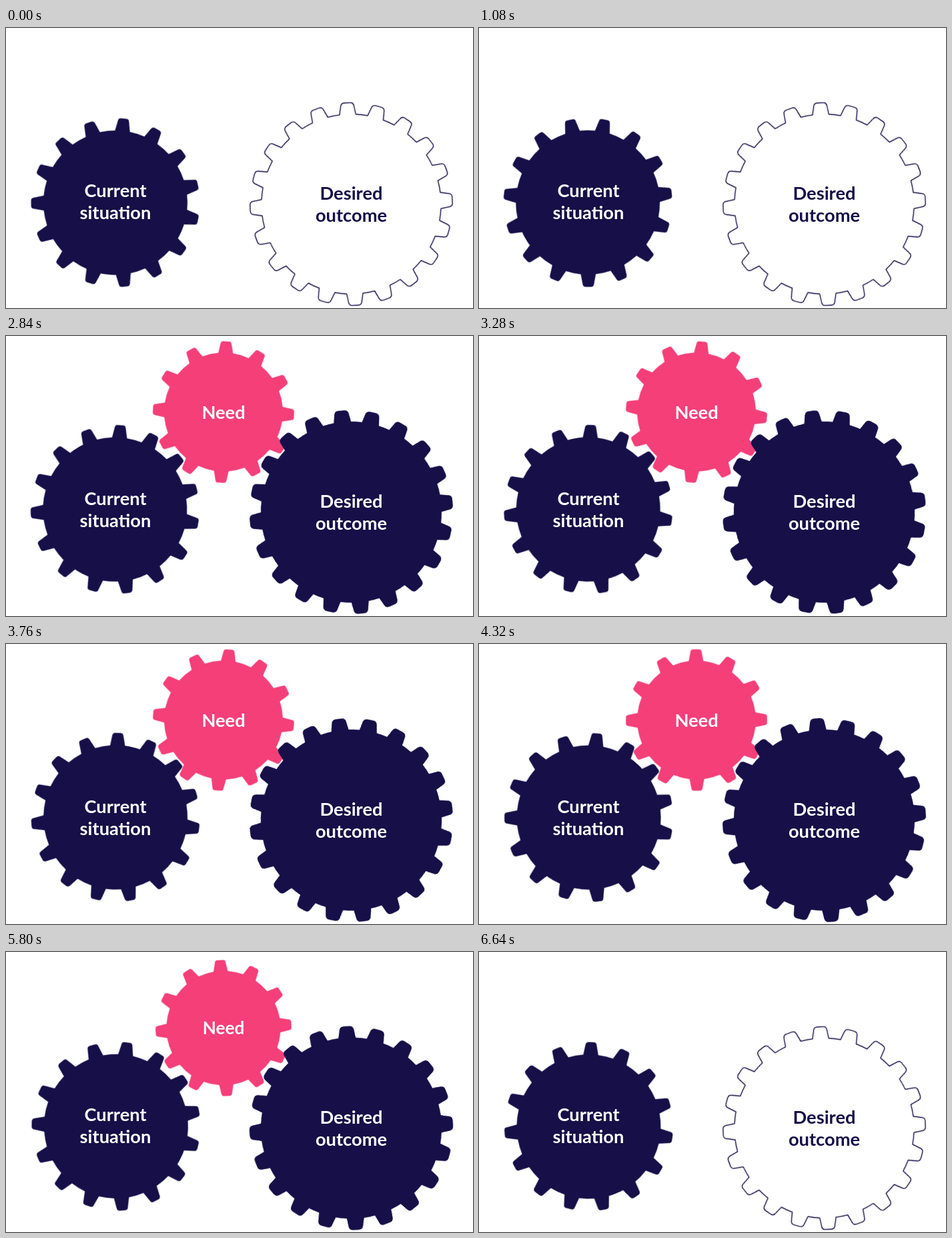
These frames come from a looping animation (700 px wide and 419 px high, 6680 ms). An HTML page:

```html
<!DOCTYPE html>
<html lang="en">
<head>
<meta charset="utf-8">
<title>Gears</title>
<style>
  html, body { margin: 0; width: 100%; height: 100%; overflow: hidden; background: #fff; }
  svg { display: block; width: 700px; height: 419px; }
  text { font: 700 27.3px Lato, sans-serif; text-anchor: middle; }
  .navy { fill: #160f48; }
  .white { fill: #fff; }
  .pink { fill: #f43f79; }
  .line { stroke: #160f48; stroke-width: 1.4; stroke-linejoin: round; }
  .hollow { fill: none; }

  .turn-left, .turn-need, .turn-right, .pop, #wave { animation: 6680ms linear infinite; }
  .turn-left { animation-name: turn-left; }
  .turn-need { animation-name: turn-need; }
  .turn-right { animation-name: turn-right; }
  .pop { animation-name: pop; }
  #wave { animation-name: sweep; }

  @keyframes turn-left {
    from { transform: rotate(0deg); }
    to { transform: rotate(334deg); }
  }
  @keyframes turn-need {
    from { transform: rotate(29.7deg); }
    to { transform: rotate(-387.8deg); }
  }
  /* rest, speed up, steady turn, slow down: half a turn in all */
  @keyframes turn-right {
    0% { transform: rotate(0deg); }
    20.96% { transform: rotate(0deg); animation-timing-function: cubic-bezier(.333, 0, .667, .333); }
    23.68% { transform: rotate(3.41deg); }
    88.35% { transform: rotate(165.4deg); animation-timing-function: cubic-bezier(.333, .667, .667, 1); }
    100% { transform: rotate(180deg); }
  }
  @keyframes pop {
    0% { transform: scale(0); }
    20.96% { transform: scale(0); animation-timing-function: cubic-bezier(.65, 0, .35, 1); }
    31.74% { transform: scale(1.035); animation-timing-function: ease-in-out; }
    38.32% { transform: scale(1); }
    83.95% { transform: scale(1); animation-timing-function: cubic-bezier(.65, 0, .35, 1); }
    98.98%, 100% { transform: scale(0); }
  }
  @keyframes sweep {
    0% { transform: translate(517.5px, 263.5px) rotate(42.1deg) translateX(-185px); }
    22.46% {
      transform: translate(517.5px, 263.5px) rotate(42.1deg) translateX(-163px);
      animation-timing-function: cubic-bezier(.45, 0, .55, 1);
    }
    39.52% { transform: translate(517.5px, 263.5px) rotate(42.1deg) translateX(160px); }
    85.93% {
      transform: translate(517.5px, 263.5px) rotate(42.1deg) translateX(160px);
      animation-timing-function: cubic-bezier(.45, 0, .55, 1);
    }
    98.8%, 100% { transform: translate(517.5px, 263.5px) rotate(42.1deg) translateX(-163px); }
  }
</style>
</head>
<body>
<svg viewBox="0 0 700 419">
  <defs>
    <path id="gear-left"/>
    <path id="gear-need"/>
    <path id="gear-right"/>
    <g id="label-right">
      <text x="517.5" y="257">Desired</text>
      <text x="517.5" y="290">outcome</text>
    </g>
    <clipPath id="filled"><path id="wave"/></clipPath>
  </defs>

  <g transform="translate(326 113.8)">
    <g class="pop">
      <g class="turn-need"><use href="#gear-need" class="pink"/></g>
      <text class="white" y="10">Need</text>
    </g>
  </g>

  <g transform="translate(164 260.4)">
    <g class="turn-left">
      <use href="#gear-left" class="navy" transform="translate(0 1) rotate(5.6)"/>
    </g>
  </g>
  <text class="white" x="164" y="253">Current</text>
  <text class="white" x="164" y="286">situation</text>

  <g transform="translate(517.5 263.5)">
    <g class="turn-right">
      <use href="#gear-right" class="hollow line" transform="rotate(15.7)"/>
    </g>
  </g>
  <use href="#label-right" class="navy"/>

  <g clip-path="url(#filled)">
    <g transform="translate(517.5 263.5)">
      <g class="turn-right">
        <use href="#gear-right" class="navy line" transform="rotate(15.7)"/>
      </g>
    </g>
    <use href="#label-right" class="white"/>
  </g>
</svg>
<script>
  // Gear outline: teeth are trapezoids with rounded tips, joined by root arcs.
  function gearPath({ teeth, root, outer, base, tip, round }) {
    const foot = Math.sqrt(root * root - base * base);
    const k = round / Math.hypot(base - tip, outer - foot);
    const sideX = tip + (base - tip) * k;
    const sideY = outer - (outer - foot) * k;
    let d = '';
    for (let i = 0; i < teeth; i++) {
      const a = i * 2 * Math.PI / teeth;
      const at = (x, r) => {
        const px = x * Math.cos(a) + r * Math.sin(a);
        const py = x * Math.sin(a) - r * Math.cos(a);
        return px.toFixed(2) + ' ' + py.toFixed(2);
      };
      d += i ? `A${root} ${root} 0 0 1 ${at(-base, foot)}` : `M${at(-base, foot)}`;
      d += `L${at(-sideX, sideY)}Q${at(-tip, outer)} ${at(round - tip, outer)}`;
      d += `L${at(tip - round, outer)}Q${at(tip, outer)} ${at(sideX, sideY)}L${at(base, foot)}`;
    }
    return d + `A${root} ${root} 0 0 1 ${(-base).toFixed(2)} ${(-foot).toFixed(2)}Z`;
  }

  // Leading edge of the fill: a shallow bow with one ripple in the middle.
  function wavePath() {
    let d = 'M-450 -220';
    for (let s = -220; s <= 220; s += 4) {
      const ripple = 8 * Math.exp(-((s / 70) ** 2)) * Math.sin(2 * Math.PI * s / 150);
      d += `L${(-0.00109 * s * s - ripple).toFixed(2)} ${s}`;
    }
    return d + 'L-450 220Z';
  }

  const draw = (id, d) => document.getElementById(id).setAttribute('d', d);
  draw('gear-left', gearPath({ teeth: 15, root: 108, outer: 126.4, base: 11.2, tip: 7.6, round: 3.5 }));
  draw('gear-need', gearPath({ teeth: 12, root: 89, outer: 105.8, base: 11, tip: 7.6, round: 3.2 }));
  draw('gear-right', gearPath({ teeth: 20, root: 134.6, outer: 151.6, base: 12.2, tip: 9, round: 4.5 }));
  draw('wave', wavePath());
</script>
</body>
</html>
```
